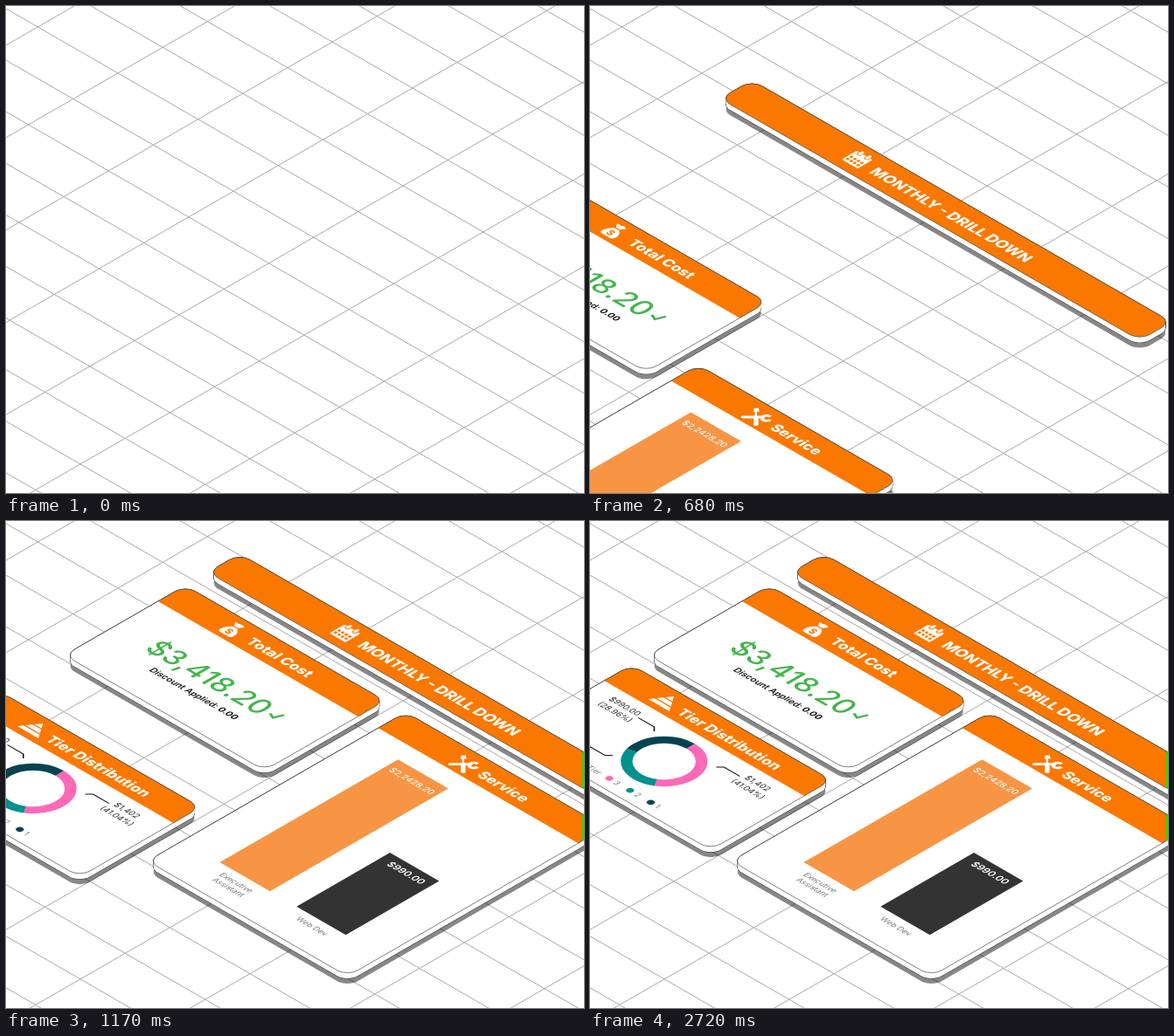
Write an HTML page that moves like this. It is 661 px wide and 558 px high and loops after 2.75 s.

```html
<!DOCTYPE html>
<html lang="en">
<head>
<meta charset="utf-8">
<title>Monthly drill down</title>
<style>
  @property --s { syntax: "<length>"; inherits: true; initial-value: 0px; }

  html, body { margin: 0; width: 100%; height: 100%; overflow: hidden; background: #fff; }
  svg { display: block; width: 661px; height: 558px; }
  text { font-family: Inter, sans-serif; text-rendering: geometricPrecision; }

  .grid { fill: none; stroke: #a8a8a8; }
  .rim, .face { stroke: #2b2b2b; vector-effect: non-scaling-stroke; }
  .rim { stroke-width: 1; }
  .face { fill: none; stroke-width: .6; }
  .side { fill: #fff; }
  .shade { fill: #000; fill-opacity: .47; }
  .head { fill: #fb7800; }
  .edge { fill: none; stroke: #22e00a; stroke-width: 2; vector-effect: non-scaling-stroke; }
  .title { font-size: 16.3px; font-weight: 800; fill: #fff; }
  .icon { fill: #fff; }
  .cut { fill: #fb7800; }
  .mid { text-anchor: middle; }
  .note { font-size: 9.5px; fill: #222; }
  .soft { font-size: 9px; fill: #777; }
  .lead { fill: none; stroke: #111; stroke-width: 1.3; }

  /* every card slides up its own y axis */
  .card { animation: 2750ms cubic-bezier(.3333, 0, .6667, 1) infinite; }
  .move { transform: translateY(var(--s)); }
  .edge { transform: translateY(calc(-1 * var(--s))); }
  .bar { animation-name: bar; }
  .cost { animation-name: cost; }
  .service { animation-name: service; }
  .tier { animation-name: tier; }
  @keyframes bar { 0% { --s: 680px; } 32.36%, 100% { --s: 0px; } }
  @keyframes cost { 0%, 6.25% { --s: 680px; } 38.61%, 100% { --s: 0px; } }
  @keyframes service { 0%, 10% { --s: 680px; } 42.36%, 100% { --s: 0px; } }
  @keyframes tier { 0%, 16.25% { --s: 680px; } 48.61%, 100% { --s: 0px; } }
</style>
</head>
<body>
<svg id="stage" viewBox="0 0 661 558"></svg>
<script>
const R = 13.5, DEPTH = 6.5, COS = .866, SLOPE = .57735, WIDTH = 661;

const text = (x, y, cls, str, extra = '') =>
  `<text x="${x}" y="${y}" class="${cls}" ${extra}>${str}</text>`;
const box = (x, y, w, h, attrs) =>
  `<rect x="${x}" y="${y}" width="${w}" height="${h}" ${attrs}/>`;
const dot = (x, y, r, fill) => `<circle cx="${x}" cy="${y}" r="${r}" fill="${fill}"/>`;

function grid() {
  let d = '';
  const line = (c, slope) => d += `M0 ${c}L${WIDTH} ${c + slope * WIDTH}`;
  for (let k = -7; k < 10; k++) line(3 + 59.1 * k, SLOPE);
  for (let k = 0; k < 9; k++) line(45 + 105.8 * k, -SLOPE);
  return `<path class="grid" d="${d}"/>`;
}

// The screen's straight down is the diagonal (1,1) in card space.
function card({ name, x, y, w, h, head, body }) {
  const slab = (d, cls) => box(d, d, w, h, `rx="${R}" class="${cls}"`);
  const stack = cls => Array.from({ length: 8 }, (_, i) => slab(i * DEPTH / 7, cls)).join('');
  const band = head < h
    ? `<path d="M0 ${head}V${R}A${R} ${R} 0 0 1 ${R} 0H${w - R}A${R} ${R} 0 0 1 ${w} ${R}V${head}z"/>`
    : box(0, 0, w, h, `rx="${R}"`);
  return `<g class="card ${name}" transform="matrix(${COS} .5 ${-COS} .5 ${x} ${y})">
    <clipPath id="${name}">${band}</clipPath>
    <g class="move">
      ${slab(DEPTH * 1.9, 'shade')}${stack('rim')}${stack('side')}
      <g class="head">${band}</g>
      ${slab(0, 'face')}
      <g clip-path="url(#${name})"><path class="edge" d="M${(WIDTH - 1 - x) / COS} 0l400 400"/></g>
      ${body}
    </g></g>`;
}

function calendar() {
  let cells = '';
  for (let i = 0; i < 8; i++)
    cells += box(152 + i % 4 * 4.6, 20.5 + (i >> 2) * 4.8, 3, 3.2, 'class="cut"');
  const ring = x => box(x - 1, 9, 5.4, 7, 'rx="2.5" class="cut"') +
    box(x, 8, 3.4, 7, 'rx="1.7" class="icon"');
  return box(150, 11.5, 21, 20, 'rx="2" class="icon"') + ring(154) + ring(163.6) + cells;
}

const bag = '<path class="icon" d="M77 8q2 1.5 4 0t4 0l2 1-3.5 5h-5L75 9z' +
  'M78 15.5h6.5q6 5 5.5 10.5-.5 4-4 4H76.5q-4 0-4-4Q72.5 20 78 15.5z"/>' +
  text(81.2, 27.5, 'cut mid', '$', 'font-size="11" font-weight="700"');

const pyramid = '<path class="icon" d="M64 8L78 28H50z"/>' +
  '<path class="cut" d="M50 14.5h28v1.7H50zM50 21.3h28v1.7H50z"/>';

const tools = '<g fill="none" stroke="#fff">' +
  '<path stroke-width="4" stroke-linecap="round" d="M89 30L102 17"/>' +
  '<path stroke-width="3.6" d="M106.5 11.5A4.3 4.3 0 1 0 110 15"/>' +
  '<path stroke-width="2" d="M90 14L98 22"/>' +
  '<path stroke-width="4.5" stroke-linecap="round" d="M99.5 23.5L106 30"/></g>' +
  '<path class="icon" d="M86 12.5l3-3 4.5 3.5-4 4z"/>';

const PINK = '#fc69b6', TEAL = '#00918f', NAVY = '#07434f';

function donut() {
  const arc = (from, len, color) =>
    `<circle cx="132" cy="89" r="35" fill="none" stroke="${color}" stroke-width="11" pathLength="100"
      stroke-dasharray="${len} ${100 - len}" stroke-dashoffset="${-from}" transform="rotate(-90 132 89)"/>`;
  return arc(0, 41.04, PINK) + arc(41.04, 30, TEAL) + arc(71.04, 28.96, NAVY);
}

const label = (x, y, sum, share) =>
  text(x, y, 'note mid', sum) + text(x, y + 13, 'note mid', `(${share}%)`);

const key = (x, n, color) => dot(x, 144.6, 3.8, color) + text(x + 7.5, 148, 'soft', n);

const cards = [
  { name: 'bar', x: 267.3, y: 37.7, w: 554, h: 42, head: 42,
    body: calendar() + text(182.5, 28.5, 'title', 'MONTHLY - DRILL DOWN', 'style="font-size:16.8px"') },

  { name: 'cost', x: 205, y: 74, w: 264, h: 159.5, head: 36,
    body: bag + text(104, 25.5, 'title', 'Total Cost') +
      text(45, 100.5, '', '$3,418.20', 'font-size="32" font-weight="500" fill="#43b54b"') +
      '<path fill="none" stroke="#43b54b" stroke-width="2.8" d="M202.5 90.5L209.5 93.5L213.5 83"/>' +
      text(73, 121.5, '', 'Discount Applied: <tspan font-weight="700">0.00</tspan>',
        'font-size="10.2" font-weight="600" fill="#111"') },

  { name: 'tier', x: 47.5, y: 165, w: 264, h: 159.5, head: 36,
    body: pyramid + text(84, 26, 'title', 'Tier Distribution') + donut() +
      label(43, 55, '$990.00', '28.96') +
      label(219, 55.5, '$1,402', '41.04') +
      label(43, 120, '$1,026', '30.00') +
      '<path class="lead" d="M65 56H86L91 61M199 56H178L173 61M65 121H86L91 116"/>' +
      text(104, 148, 'soft', 'Tier', 'text-anchor="end"') +
      key(115.3, 3, PINK) + key(142.7, 2, TEAL) + key(170, 1, NAVY) },

  { name: 'service', x: 457, y: 219.2, w: 264, h: 340.8, head: 36,
    body: tools + text(119, 26, 'title', 'Service') +
      box(49, 59, 66.4, 235.5, 'fill="#f79545"') +
      box(150.5, 171.2, 65, 123.3, 'fill="#333"') +
      text(83, 78, 'mid', '$2,2428.20', 'font-size="10" font-weight="500" fill="#fff"') +
      text(184.5, 187.5, 'mid', '$990.00', 'font-size="11" font-weight="600" fill="#fff"') +
      text(83.5, 310, 'soft mid', 'Executive') + text(83.5, 320.5, 'soft mid', 'Assistant') +
      text(183.5, 310, 'soft mid', 'Web Dev') }
];

document.getElementById('stage').innerHTML = grid() + cards.map(card).join('');
</script>
</body>
</html>
```
